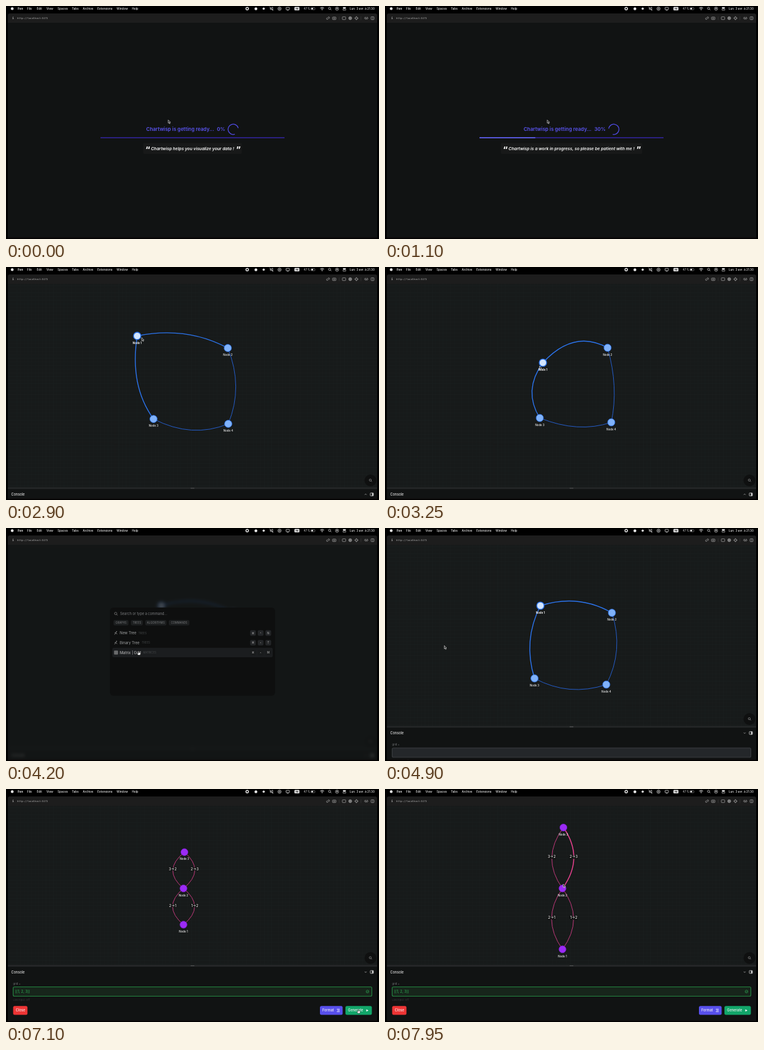
Animation, 600 px wide and 375 px high, one loop 8000 ms. Source, as an HTML page with a canvas:

```html
<!DOCTYPE html>
<html lang="en">
<head>
<meta charset="utf-8">
<style>
  html, body { margin: 0; width: 100%; height: 100%; overflow: hidden; background: #000; }
  canvas { display: block; width: 600px; height: 375px; }
</style>
</head>
<body>
<canvas id="stage"></canvas>
<script>
const LOOP = 8000;
const canvas = document.getElementById('stage');
const c = canvas.getContext('2d');
const scale = window.devicePixelRatio || 1;
canvas.width = 600 * scale;
canvas.height = 375 * scale;

// ---------- helpers ----------
const SANS = 'Inter, sans-serif', MONO = '"DejaVu Sans Mono", monospace';
const clamp = v => Math.max(0, Math.min(1, v));
const ramp = (t, from, to) => { const p = clamp((t - from) / (to - from)); return p * p * (3 - 2 * p); };

// Eased interpolation between keys of the form [time, ...values].
function keyed(t, keys) {
  let i = 0;
  while (i < keys.length - 2 && t > keys[i + 1][0]) i++;
  const [a, b] = [keys[i], keys[i + 1]];
  const p = ramp(t, a[0], b[0]);
  return a.slice(1).map((v, n) => v + (b[n + 1] - v) * p);
}

function font(size, style = '400', family = SANS) {
  c.font = `${style} ${size}px ${family}`;
}
// y is the middle of the capitals.
function text(s, x, y, size, color, style, align = 'left', family) {
  font(size, style, family);
  c.textAlign = align;
  c.fillStyle = color;
  c.fillText(s, x, y + size * 0.36);
}
function rect(x, y, w, h, fill, r = 0, stroke, lineWidth = 1) {
  c.beginPath();
  c.roundRect(x, y, w, h, r);
  if (fill) { c.fillStyle = fill; c.fill(); }
  if (stroke) { c.strokeStyle = stroke; c.lineWidth = lineWidth; c.stroke(); }
}
function disc(x, y, r, fill, stroke, lineWidth = 0.8) {
  c.beginPath();
  c.ellipse(x, y, r, r, 0, 0, Math.PI * 2);
  if (fill) { c.fillStyle = fill; c.fill(); }
  if (stroke) { c.strokeStyle = stroke; c.lineWidth = lineWidth; c.stroke(); }
}
function path(d, x, y, stroke, lineWidth = 0.8, fill) {
  c.save();
  c.translate(x, y);
  const p = new Path2D(d);
  if (fill) { c.fillStyle = fill; c.fill(p); }
  if (stroke) { c.strokeStyle = stroke; c.lineWidth = lineWidth; c.stroke(p); }
  c.restore();
}
const magnifier = (x, y, r, color) => {
  disc(x - r * 0.25, y - r * 0.25, r * 0.8, null, color, 0.7);
  path(`M${r * 0.35} ${r * 0.35}L${r} ${r}`, x, y, color, 0.8);
};

// ---------- browser chrome ----------
function drawChrome() {
  rect(0, 0, 600, 375, '#000');
  const white = '#e8e8e8';
  disc(10, 4.3, 2.2, white);
  text('Fen', 19, 4.3, 4.7, white, '700');
  [['File', 34], ['Edit', 49.5], ['View', 65], ['Spaces', 83], ['Tabs', 106], ['Archive', 123.5],
   ['Extensions', 147], ['Window', 178], ['Help', 202.5]]
    .forEach(([s, x]) => text(s, x, 4.3, 4.65, white, '500'));

  disc(388, 4.3, 2, null, white, 1.4);
  disc(402, 4.5, 2.3, white);
  disc(414.5, 4.3, 1.8, white);
  path('M-2 -1H0L2 -2.5V2.5L0 1H-2ZM-3 -3L3 3', 427, 4.3, white, 0.7);
  disc(440, 4.3, 2.6, null, white, 0.7);
  disc(440, 4.3, 1, null, white, 0.7);
  rect(450.5, 2.2, 5.5, 3.6, null, 0.5, white, 0.7);
  path('M-1.5 0H1.5', 453.2, 7, white, 0.7);
  rect(464, 1.5, 8, 5.6, white, 1);
  text('FR', 468, 4.3, 3.8, '#111', '600', 'center');
  text('47 %', 479, 4.3, 4.2, white);
  rect(490.5, 2.6, 6.5, 3.4, null, 1, '#aaa', 0.5);
  rect(491.2, 3.2, 2.8, 2.2, white);
  path('M-3 -1Q0 -3.5 3 -1M-1.8 .4Q0 -1.2 1.8 .4', 508.5, 4.3, white, 0.9);
  disc(508.5, 6, 0.7, white);
  magnifier(521, 4.3, 2.2, white);
  disc(532.5, 4.3, 2.5, null, white, 0.7);
  disc(532.5, 4, 1, white);
  rect(541.8, 2, 5, 2, white, 1);
  rect(541.8, 4.8, 5, 2, null, 1, white, 0.6);
  text('Lun. 3 avr. à 21:30', 553, 4.3, 4.6, white, '500');

  rect(3, 12, 594, 15.5, '#1d1d1d', [3, 3, 0, 0]);
  const gray = '#aaa';
  text('i', 11.3, 19.6, 5, gray, '700', 'center', MONO);
  text('http://localhost:5173', 18, 19.6, 3.9, '#b5b5b5', '400', 'left', MONO);
  path('M-.5 .5L.8 -.8M-.3 -1L1 -2.2Q3 -2 2.2 0L1 1.2M.3 1L-1 2.2Q-3 2 -2.2 0L-1 -1.2', 518, 19.6, gray, 0.7);
  rect(525.2, 17.8, 5.6, 4, null, 0.8, gray, 0.7);
  disc(528, 19.8, 1, null, gray, 0.6);
  path('M0 -3V3', 536, 19.6, '#444', 0.5);
  rect(541, 17.4, 5.4, 4.4, null, 0.8, gray, 0.7);
  disc(553.7, 19.6, 2.4, '#777', gray, 0.7);
  disc(563.7, 19.6, 2, null, gray, 0.7);
  path('M0 -3.2V-1M0 1V3.2M-3.2 0H-1M1 0H3.2', 563.7, 19.6, gray, 0.6);
  path('M0 -3V3', 571, 19.6, '#444', 0.5);
  path('M-1 -1.8L-3 0L-1 1.8L2 -1.8M1 -1.8L3 0L1 1.8L-2 -1.8', 579.5, 19.6, gray, 0.7);
  rect(587.2, 17.3, 4.8, 4.6, null, 0.8, gray, 0.7);
  path('M0 -2.3V2.3', 589.8, 19.6, gray, 0.6);
}

// ---------- loading screen ----------
const TIPS = ['Chartwisp helps you visualize your data !',
              'Chartwisp is a work in progress, so please be patient with me !'];

function drawLoader(t) {
  rect(3, 27, 594, 345.5, '#111313');
  const progress = Math.min(1, (t / 1850) ** 2.3);
  const title = 'Chartwisp is getting ready...';
  const percent = Math.floor(progress * 100) + '%';
  font(8, '600');
  const titleWidth = c.measureText(title).width, percentWidth = c.measureText(percent).width;
  const left = 300 - (titleWidth + percentWidth + 26.5) / 2;
  text(title, left, 198.6, 8, '#5a54f0', '600');
  text(percent, left + titleWidth + 4.5, 198.6, 8, '#5a54f0', '600');

  const gap = 0.5 + t / 832 * Math.PI * 2;
  c.beginPath();
  c.ellipse(left + titleWidth + percentWidth + 17.5, 198.5, 8.3, 8.3, gap, 0.75, Math.PI * 2 - 0.75);
  c.strokeStyle = '#4f4ae0';
  c.lineWidth = 1.3;
  c.stroke();

  rect(152, 211.2, 296, 1.6, '#3424a4');
  rect(152, 211.2, 296 * progress, 1.6, '#6468f4');

  const tip = TIPS[t < 600 ? 0 : 1], style = 'italic 600';
  font(6.7, style);
  const half = c.measureText(tip).width / 2;
  rect(300 - half - 12.5, 220.5, half * 2 + 25, 17.5, '#181919', 2);
  text(tip, 300, 229.4, 6.7, '#fff', style, 'center');
  text('“', 300 - half - 5.2, 231.5, 13, '#fff', '800', 'center');
  text('”', 300 + half + 7, 231.5, 13, '#fff', '800', 'center');
}

// ---------- graphs ----------
function edge(a, via, b, color, width) {
  c.beginPath();
  c.moveTo(...a);
  c.quadraticCurveTo(...via, ...b);
  c.strokeStyle = color;
  c.lineWidth = width;
  c.stroke();
}

// Each pose: time, nodes 1 to 4, then the bend points of edges 1-2, 1-3, 2-4, 3-4.
const POSES = [
  [2600, 241.5, 138.5, 358.5, 138.5, 241.5, 255.5, 358.5, 255.5, 300, 112, 215, 197, 385, 197, 300, 281.5],
  [2820, 196, 106, 356, 131, 235, 245, 356, 253, 285, 94, 192, 190, 383, 193, 297, 278],
  [3110, 275, 132, 360, 128, 247, 243, 364, 250, 311, 98, 226, 196, 378, 192, 309, 270],
  [3250, 254, 154, 358, 130, 249, 243, 364, 250, 304, 100, 221.5, 199, 376, 193, 311, 268],
  [3600, 250, 125, 365, 136.5, 240.5, 242, 356, 252, 311, 105.5, 221.5, 181, 384.5, 197, 296, 272]
];

function drawSquareGraph(t) {
  const v = keyed(t, POSES);
  const p = n => [v[n * 2], v[n * 2 + 1]];
  const selected = t >= 2580;
  [[0, 1], [0, 2], [1, 3], [2, 3]].forEach(([a, b], i) => {
    const strong = selected && a === 0;
    edge(p(a), p(4 + i), p(b), strong ? '#2b74ee' : '#2560d2', strong ? 1.4 : 0.95);
  });
  for (let n = 0; n < 4; n++) {
    const [x, y] = p(n), active = selected && n === 0;
    disc(x, y, 5.9, active ? '#d2e5ff' : '#80b2fa', '#2b74ee', active ? 1.4 : 0.8);
    text('Node ' + (n + 1), x, y + 11, 4.4, '#f2f2f2', active ? '700' : '500', 'center');
  }
}

function drawChainGraph(t) {
  const [top, middle, bottom] = keyed(t, [[7000, 104, 160, 216], [7700, 62, 160, 258]]);
  const nodes = [[285.5, bottom], [285.5, middle], [287, top]];
  [[1, 0], [2, 1]].forEach(([a, b]) => [-1, 1].forEach(side => {
    const y = (nodes[a][1] + nodes[b][1]) / 2, x = 285.8 + side * 17.7;
    const hot = side > 0 && a === 2 && t > 7650;
    edge(nodes[a], [285.8 + side * 35.4, y], nodes[b], hot ? '#e8418f' : '#c93a80', hot ? 1.5 : 0.95);
    const label = side < 0 ? `${a + 1}→${b + 1}` : `${b + 1}→${a + 1}`;
    font(5.8, '600');
    c.textAlign = 'center';
    c.strokeStyle = '#0c0c0c';
    c.lineWidth = 1.6;
    c.strokeText(label, x, y + 0.5);
    text(label, x, y - 1.6, 5.8, '#d5d5d5', '600', 'center');
  }));
  nodes.forEach(([x, y], i) => {
    disc(x, y, 5.6, '#9b2bf5', '#8a20e4');
    text('Node ' + (i + 1), x, y + 11, 4.4, '#f2f2f2', '500', 'center');
  });
}

// ---------- console ----------
const ENTRY = '[[1, 2, 3]]';

function button(x, w, label, color, labelX) {
  rect(x, 349.3, w, 14.2, color, 2.5);
  text(label, labelX, 356.5, 5.5, '#f4f4f4', '500');
}

function drawConsole(t) {
  const open = ramp(t, 4720, 5080), dy = 71.5 * (1 - open);
  c.save();
  c.translate(0, dy);
  disc(586.3, 272, 9.5, '#0f1010');
  magnifier(586.5, 272, 2.1, '#999');

  rect(3, 283, 594, 3, '#242627');
  [-2, 0, 2].forEach(d => disc(300 + d, 284.5, 0.6, '#888'));
  rect(3, 286, 594, 90, '#111313');
  text('Console', 8.5, 294.6, 5.5, '#e4e4e4', '500');
  path(open > 0.5 ? 'M-1.4 -.6L0 .8L1.4 -.6' : 'M-1.4 .6L0 -.8L1.4 .6', 578.5, 294.5, '#bbb');
  rect(586, 292.2, 5, 4.6, null, 0.6, '#ccc', 0.8);
  rect(588.7, 292.2, 2.3, 4.6, '#ccc');

  const typed = ENTRY.slice(0, Math.max(0, Math.floor((t - 5750) / 55)));
  const valid = typed === ENTRY, focused = t > 5400 && t < 7000;
  text('grid =', 11.5, 313.2, 4.2, '#747678');
  rect(11.5, 318.5, 577, 15, valid ? '#17251b' : '#24272a', 2,
    valid ? '#248540' : focused ? '#4189ee' : '#3a3d40', 1.1);
  text(typed, 14.5, 326.2, 5.7, valid ? '#2fb457' : '#ddd');
  if (focused && ((t - 5400) % 1060 < 530 || t > 5750 && !valid)) {
    font(5.7);
    rect(14.6 + c.measureText(typed).width, 322.5, 0.6, 7, '#ddd');
  }
  if (valid) {
    disc(581.5, 326, 2.2, null, '#2fa352', 0.7);
    path('M-1 0L-.2 .8L1 -.8', 581.5, 326, '#2fa352', 0.7);
  }
  text('Live input: Off', 11.5, 339.5, 4, '#37393b');
  button(11.5, 23, 'Close', '#ee3535', 15.8);
  button(505, 36.5, 'Format', '#5850ec', 509);
  path('M-2.3 -2H2.3M-1.5 0H2.3M-2.3 2H2.3', 534.5, 356.4, '#fff', 0.8);
  button(546, 42.5, 'Generate', '#12a66a', 550.3);
  path('M-1.4 -1.9L2 0L-1.4 1.9Z', 581, 356.4, null, 0, '#fff');
  c.restore();
}

function drawWorkspace(t) {
  rect(3, 27, 594, 345.5, '#171a1a');
  c.beginPath();
  for (let x = 6; x < 597; x += 5.85) { c.moveTo(x, 27); c.lineTo(x, 372); }
  for (let y = 30; y < 372; y += 5.85) { c.moveTo(3, y); c.lineTo(597, y); }
  c.strokeStyle = '#1d2020';
  c.lineWidth = 0.5;
  c.stroke();
  if (t < 7000) drawSquareGraph(t); else drawChainGraph(t);
  drawConsole(t);
}

// ---------- command palette ----------
const COMMANDS = [['New Tree', 'TREES', 'N', 213], ['Binary Tree', 'TREES', 'T', 218.5],
                  ['Matrix | Grid', 'MATRICES', 'M', 220.5]];

function drawPalette(t) {
  const veil = ramp(t, 3550, 3700) * (1 - ramp(t, 4230, 4500));
  if (veil <= 0) return;
  c.filter = `blur(${2.6 * veil * scale}px)`;
  c.drawImage(canvas, 0, 0, 600, 375);
  c.filter = 'none';
  rect(3, 27, 594, 346, `rgba(19,22,22,${0.76 * veil})`);
  if (t >= 4240) return;

  c.globalAlpha = veil;
  rect(167, 128, 266, 142, '#0e0f0f', 6);
  magnifier(177, 138.2, 2.4, '#888');
  text('Search or type a command...', 183.5, 138.3, 5.55, '#7d7f80');
  [['GRAPHS', 173, 24], ['TREES', 201, 19], ['ALGORITHMS', 224, 34], ['COMMANDS', 262, 33]]
    .forEach(([s, x, w]) => {
      rect(x, 148.3, w, 8.4, '#1d1f20', 2);
      text(s, x + w / 2, 152.6, 4.3, '#77797b', '400', 'center');
    });
  COMMANDS.forEach(([name, group, key, groupX], i) => {
    const y = 169 + i * 15.7, active = i === 2;
    if (active) {
      rect(171, y - 7.6, 258, 15.2, '#1b1d1f', 2.5);
      rect(174.3, y - 2.6, 5.4, 5.4, null, 0, '#aaa', 0.6);
      path('M-.9 -2.7V2.7M.9 -2.7V2.7M-2.7 -.9H2.7M-2.7 .9H2.7', 177, y + 0.1, '#aaa', 0.6);
    } else {
      path('M-2.4 2.6L-.4 -.2L1.8 1.8M-.4 -.2L.8 -2.4M-.4 -.2L-2.2 -.4', 177, y, '#999', 0.8);
      disc(177.8, y - 2.4, 0.7, '#999');
    }
    text(name, 183, y, 5.9, active ? '#c4c4c4' : '#a0a2a3');
    text(group, groupX, y, 4.2, '#45484a');
    ['⌘', '^', key].forEach((s, n) => {
      const x = 397.3 + n * 12.3;
      rect(x - 4.6, y - 4.4, 9.2, 8.8, active ? '#191b1c' : '#232527', 2);
      text(s, x, y + (s === '^' ? 0.8 : 0), 4.3, '#a5a5a5', '500', 'center', 'Inter, "DejaVu Sans", sans-serif');
    });
  });
  c.globalAlpha = 1;
}

// ---------- pointer ----------
const POINTER = [
  [1750, 261, 183.5], [2350, 240.3, 151.5], [2400, 240.3, 151.5], [2570, 241.5, 140], [2800, 194, 106],
  [3080, 276, 132], [3250, 248.5, 159.5], [3400, 246, 138], [3550, 246, 138], [4100, 213.5, 198.5],
  [4250, 213.5, 198.5], [4550, 105, 156], [4700, 105, 156], [5400, 57, 322.5], [6400, 57, 322.5],
  [6850, 567, 355], [7100, 567, 355], [7750, 286.5, 153], [8000, 286.5, 153]
];

function drawPointer(t) {
  const [x, y] = keyed(t, POINTER);
  if (t > 5300 && t < 6450) {
    path('M-1.2 -2.8Q0 -2.8 0 -2V2Q0 2.8 -1.2 2.8M1.2 -2.8Q0 -2.8 0 -2M0 2Q0 2.8 1.2 2.8', x, y, '#eee', 0.7);
  } else if (t > 4050 && t < 4260 || t > 6780 && t < 7180) {
    path('M-.6 0Q0 -.8 .6 0V2L2.8 2.6V4.4L2 6H-1L-2.6 3.4L-1.8 2.8L-.6 3.6Z', x, y, '#111', 0.5, '#fff');
  } else {
    path('M0 0V5L1.2 4L2.1 6L3 5.6L2.1 3.7H3.6Z', x, y, '#ddd', 0.7, '#111');
  }
}

// ---------- loop ----------
function draw(t) {
  c.setTransform(scale, 0, 0, scale, 0, 0);
  drawChrome();
  c.save();
  c.beginPath();
  c.rect(3, 27, 594, 345.5);
  c.clip();
  if (t < 1850) {
    drawLoader(t);
  } else {
    drawWorkspace(t);
    drawPalette(t);
  }
  c.restore();
  path('M0 0H594', 3, 373, '#221c1e', 0.6);
  drawPointer(t);
}

const start = performance.now();
function tick() {
  draw((performance.now() - start) % LOOP);
  requestAnimationFrame(tick);
}
tick();
</script>
</body>
</html>
```
